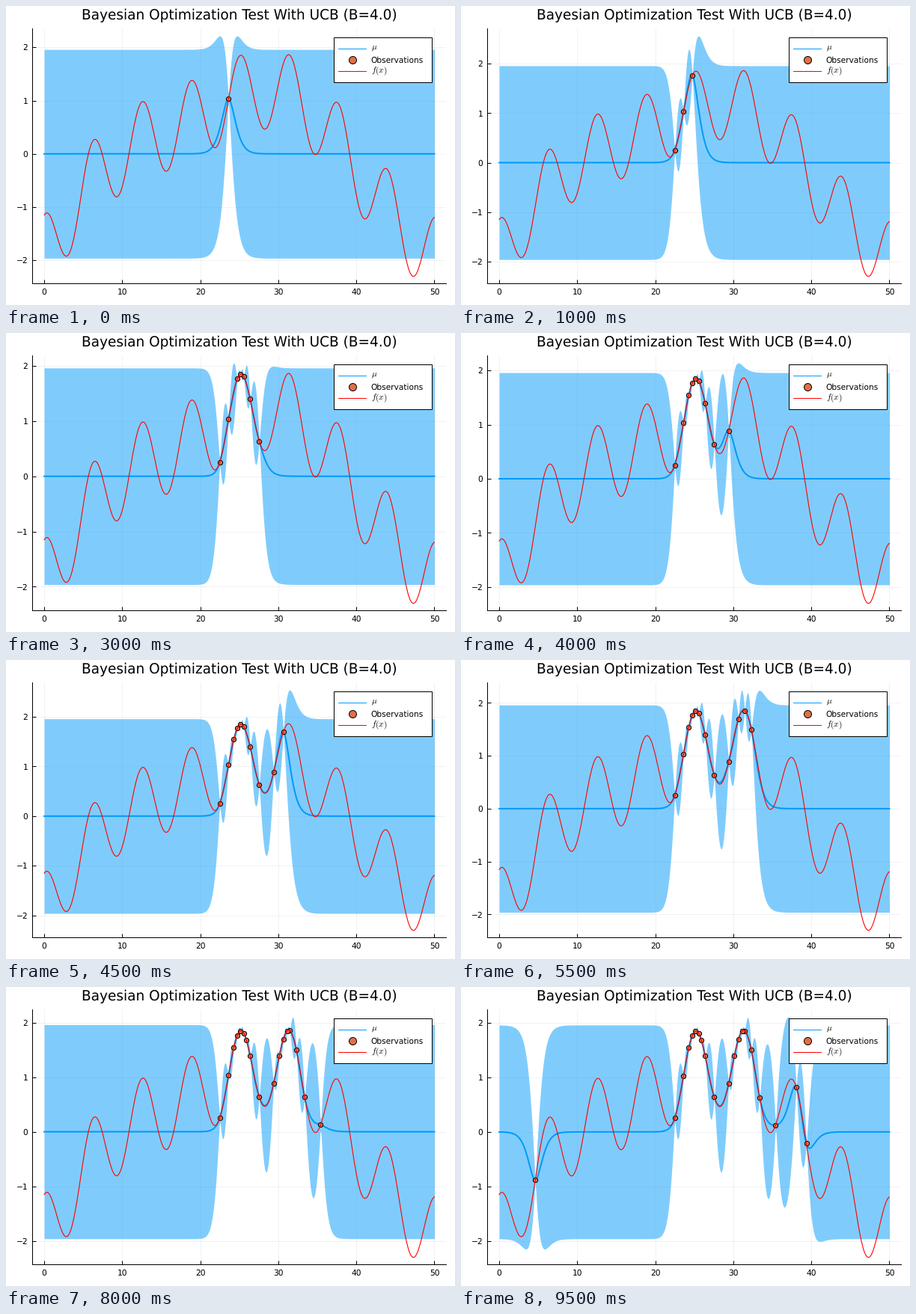
Animation, 600 px wide and 400 px high, one loop 10000 ms. Source, as a matplotlib script:

```python
import numpy as np
import matplotlib.pyplot as plt
from matplotlib.animation import FuncAnimation
from matplotlib.patches import Rectangle

DPI = 100
PX = 72 / DPI  # points per pixel
BLUE, ORANGE, RED = "#009AFA", "#E36F47", "#FF0000"

plt.rcParams.update({
    "font.family": "DejaVu Sans",
    "mathtext.fontset": "cm",
    "text.hinting": "none",
    "axes.unicode_minus": True,
})


def objective(x):
    return (0.75 * np.cos(x) + 0.25 * np.sin(x / 4)
            + 3 * np.sin(np.pi * x / 50) - 1.901)


def matern52(a, b):
    s = np.sqrt(5) * np.abs(a[:, None] - b[None, :])
    return (1 + s + s ** 2 / 3) * np.exp(-s)


def posterior(seen, grid, noise=1e-6):
    """Mean and standard deviation of the Gaussian process on the grid."""
    cross = matern52(seen, grid)
    weights = np.linalg.solve(matern52(seen, seen) + noise * np.eye(len(seen)), cross)
    variance = 1 - np.sum(cross * weights, axis=0)
    return weights.T @ objective(seen), np.sqrt(np.maximum(variance, 0))


# Sampled locations, in the order they are tried
samples = np.array([23.61, 22.50, 24.74, 25.56, 26.39, 25.15, 27.56, 24.29, 29.41, 30.65,
                    31.46, 32.31, 33.37, 31.12, 35.42, 25.91, 30.13, 38.07, 39.36, 4.62])
grid = np.linspace(0, 50, 500)
truth = objective(grid)

fig = plt.figure(figsize=(6, 4), dpi=DPI, facecolor="white")

# Plot area
left, right, top, bottom = 35.4, 588.1, 30.4, 371.4
ax = fig.add_axes([left / 600, 1 - bottom / 400, (right - left) / 600, (bottom - top) / 400])
ax.set_xlim(-1.5, 51.5)
ax.set_xticks(range(0, 51, 10))
ax.set_yticks(range(-2, 3))
ax.set_axisbelow(True)
ax.grid(color="black", alpha=0.1, lw=0.5 * PX)
ax.tick_params(direction="in", length=5 * PX, width=PX, pad=6.2 * PX, labelsize=10.67 * PX)
for side, spine in ax.spines.items():
    spine.set_visible(side in ("left", "bottom"))
    spine.set_linewidth(PX)


def markers(axes, x, y, size, **kw):
    return axes.scatter(x, y, s=(size * PX) ** 2, fc=ORANGE, ec="black",
                        lw=PX, snap=False, **kw)


mean_line, = ax.plot([], [], color=BLUE, lw=2 * PX, zorder=3)
dots = markers(ax, samples[:1], objective(samples[:1]), 6.2, zorder=4)
ax.plot(grid, truth, color=RED, lw=1.1 * PX, zorder=5)
band = ax.fill_between(grid, -1 + 0 * grid, 1 + 0 * grid, color=BLUE, alpha=0.5, lw=0, zorder=2)

# Title and legend, laid out in stage pixels
page = fig.add_axes([0, 0, 1, 1], zorder=5)
page.axis("off")


def label(x, y, text, size, **kw):
    page.text(x, y, text, fontsize=size * PX, **kw)


label(311.7, 18, "Bayesian Optimization Test With UCB (B=4.0)", 18.53, ha="center")
page.add_patch(Rectangle((438.2, 42.2), 131, 60, fc="white", ec="black", lw=PX))
page.plot([444, 481], [57.2, 57.2], color=BLUE, lw=PX)
markers(page, [462.5], [72.4], 10, zorder=3)
page.plot([444, 481], [87.2, 87.2], color=RED, lw=PX)
label(487.8, 58.5, r"$\mu$", 11.3)
label(487.6, 75.6, "Observations", 10.67)
label(487.8, 89.8, r"$f(x)$", 11.3)
page.set_xlim(0, 600)
page.set_ylim(400, 0)


def update(frame):
    seen = samples[:frame + 1]
    mean, sd = posterior(seen, grid)
    low, high = mean - 1.96 * sd, mean + 1.96 * sd
    mean_line.set_data(grid, mean)
    dots.set_offsets(np.column_stack([seen, objective(seen)]))
    outline = np.column_stack([np.r_[grid, grid[::-1]], np.r_[high, low[::-1]]])
    band.set_verts([outline])
    y_min, y_max = min(low.min(), truth.min()), max(high.max(), truth.max())
    pad = 0.03 * (y_max - y_min)
    ax.set_ylim(y_min - pad, y_max + pad)
    return mean_line, dots, band


anim = FuncAnimation(fig, update, frames=len(samples), interval=500,
                     repeat=True, repeat_delay=0, blit=False)
plt.show()
```
